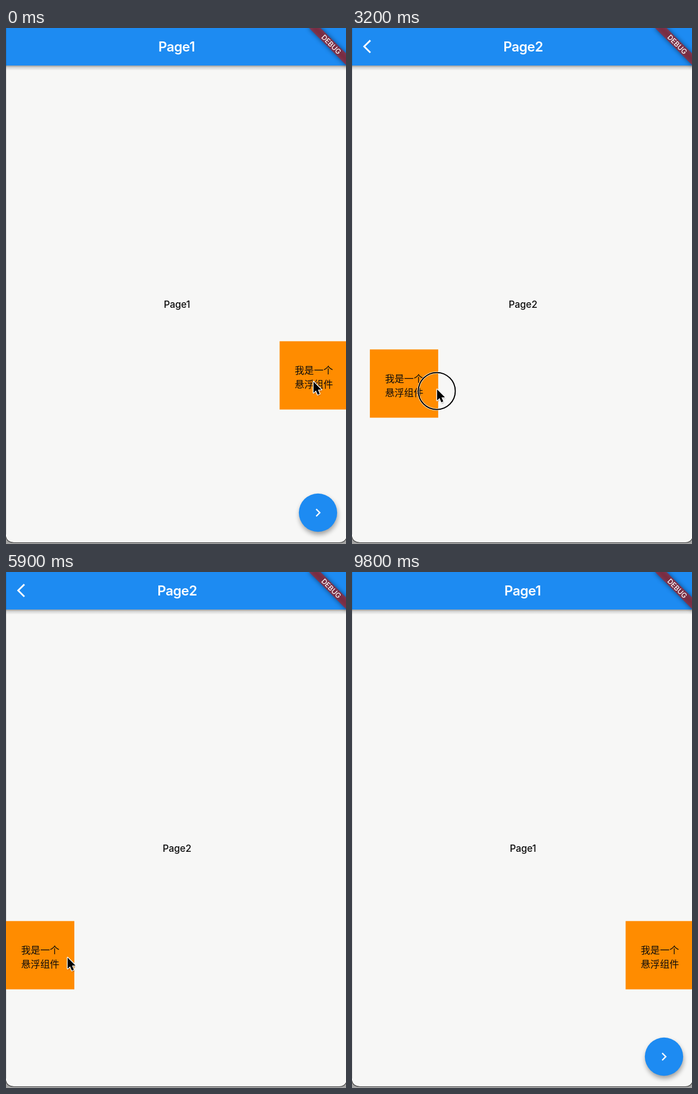
Recreate the animation shown at these times as an HTML page. Size 607 by 922 pixels, loop 9900 ms.

```html
<!DOCTYPE html>
<html lang="zh">
<head>
<meta charset="utf-8">
<title>Floating widget</title>
<style>
  html, body { margin: 0; width: 100%; height: 100%; overflow: hidden; background: #f7f7f6; }
  svg { display: block; width: 607px; height: 922px; }
  text { font: 500 17px Inter, sans-serif; letter-spacing: -.1px; fill: #0c0c0c; }
  .title { font-size: 24px; font-weight: 600; letter-spacing: -.5px; fill: #fff; }
  .mid { text-anchor: middle; }
  .float { font: 17.1px "Noto Sans CJK SC", "Noto Sans CJK", sans-serif; letter-spacing: 0; }
  .debug { font-size: 12.5px; letter-spacing: 0; fill: #fff; }
  .tip { font-size: 14.8px; font-weight: 400; fill: #fff; }
</style>
</head>
<body>
<svg viewBox="0 0 607 922">
  <defs>
    <linearGradient id="drop" x2="0" y2="1">
      <stop stop-color="#000" stop-opacity=".36"/>
      <stop offset=".4" stop-color="#000" stop-opacity=".13"/>
      <stop offset="1" stop-color="#000" stop-opacity="0"/>
    </linearGradient>
    <linearGradient id="edge">
      <stop stop-color="#000" stop-opacity="0"/>
      <stop offset=".6" stop-color="#000" stop-opacity=".05"/>
      <stop offset="1" stop-color="#000" stop-opacity=".2"/>
    </linearGradient>
    <filter id="soft" x="-50%" y="-150%" width="200%" height="400%">
      <feGaussianBlur stdDeviation="4"/>
    </filter>
    <filter id="blur" x="-50%" y="-50%" width="200%" height="200%">
      <feGaussianBlur stdDeviation="1.5"/>
    </filter>
    <g id="sheet">
      <rect width="610" height="922" fill="#f7f7f6"/>
      <rect y="67" width="610" height="9" fill="url(#drop)"/>
      <rect width="610" height="67" fill="#1d8bf2"/>
    </g>
    <path id="pointer" d="M0 0V22.5L5 17.8 8.6 26.3 12.6 24.6 9 16.2H16Z"/>
  </defs>

  <g id="page1">
    <use href="#sheet"/>
    <text class="title mid" x="304.5" y="42">Page1</text>
    <text class="mid" x="305.3" y="500">Page1</text>
    <circle cx="558" cy="871" r="34" opacity=".36" filter="url(#soft)"/>
    <circle cx="557" cy="866" r="34.2" fill="#1d8bf2"/>
    <path transform="translate(542.4 851.4) scale(1.22)" fill="#fff"
      d="M10 6 8.6 7.4 13.2 12 8.6 16.6 10 18 16 12Z"/>
  </g>

  <g id="page2">
    <rect x="-26" width="26" height="922" fill="url(#edge)"/>
    <use href="#sheet"/>
    <path transform="translate(19.6 18.4) scale(1.22)" fill="#fff"
      d="M11.7 3.9 9.9 2.1 0 12 9.9 21.9 11.7 20.1 3.5 12Z"/>
    <text class="title mid" x="305.5" y="42">Page2</text>
    <text class="mid" x="305.3" y="500">Page2</text>
  </g>

  <path d="M.5 0V905" stroke="#000" stroke-opacity=".12"/>

  <g id="box">
    <rect width="122" height="122" fill="#ff8c00"/>
    <text class="float" x="27" y="58.8">我是一个</text>
    <text class="float" x="27" y="83.2">悬浮组件</text>
  </g>

  <g id="tip">
    <rect x="12" y="62.5" width="49" height="29" rx="5" fill="#585858" opacity=".92"/>
    <text class="tip" x="21.5" y="82.5">Back</text>
  </g>

  <g transform="translate(610 0) rotate(45)">
    <rect x="-48.8" y="34.2" width="97.6" height="14.6" opacity=".5" filter="url(#soft)"/>
    <rect x="-48.8" y="34.2" width="97.6" height="14.6" fill="#b71c1c" fill-opacity=".627"/>
    <text class="debug mid" y="46">DEBUG</text>
  </g>

  <path d="M-1 905Q0 919.5 14 919.5H595Q606 919.5 609 908V925H-1Z"
    fill="#a4a4a4" stroke="#484848" stroke-width="1.2"/>

  <g id="ring" fill="none">
    <circle stroke="#fff" stroke-width="4" stroke-opacity=".75"/>
    <circle stroke="#000" stroke-width="2"/>
  </g>

  <g id="cursor">
    <g id="arrow" transform="scale(.88)">
      <use href="#pointer" x="1" y="2.5" opacity=".4" filter="url(#blur)"/>
      <use href="#pointer" stroke="#fff" stroke-width="3" stroke-linejoin="round"/>
      <use href="#pointer"/>
    </g>
    <g id="hand" stroke="#000" stroke-width="1.4" stroke-linejoin="round">
      <path fill="#fff" d="M-3 3C-4 0 0-1 1 2L4 10C6 8 8 9 8.5 11 10 9.5 12 10 12.5 12
        14 11 15 12 15 14 16 18 15 20 13 24H4C2 21-3 18-5 14-6 11-3 11 0 14Z"/>
      <path fill="none" d="M5 16V20M8.5 15.5V20M12 15V19.5"/>
    </g>
  </g>
</svg>

<script>
const LOOP = 9900, STEP = 100, WIDTH = 610, RIGHT = 488.5;
const el = id => document.getElementById(id);
const [page1, page2, box, tip, ring, cursor, arrow, hand] =
  ['page1', 'page2', 'box', 'tip', 'ring', 'cursor', 'arrow', 'hand'].map(el);
const circles = ring.querySelectorAll('circle');

// The pointer's script: each call appends one stretch of time.
const acts = [];
let clock = 0, spot = [549, 632];
function act(kind, ms, to = spot) {
  acts.push({ kind, start: clock, end: clock += ms, from: spot, to });
  spot = to;
}
const go = (x, y, ms) => act('go', ms, [x, y]);
const drag = (x, y, ms) => act('drag', ms, [x, y]);
const rest = ms => act('rest', ms);
const tap = () => act('tap', 90);

go(549, 625, 300);
drag(550, 638, 600);
drag(120, 636, 500);
rest(100);
go(548, 871, 500);
rest(200);
tap();
rest(210);
go(120, 642, 580);
drag(524, 688, 1520);
go(527, 682, 300);
rest(300);
drag(110, 689, 500);
rest(400);
drag(530, 689, 400);
go(34, 53, 400);
rest(110);
tap();
rest(1900);
go(603, 930, 700);

const drags = acts.filter(a => a.kind === 'drag');
const [push, pop] = acts.filter(a => a.kind === 'tap').map(a => a.end);

const clamp = (v, lo = 0, hi = 1) => Math.min(hi, Math.max(lo, v));
const smooth = k => k * k * (3 - 2 * k);
const mix = (a, b, k) => a + (b - a) * k;
const near = (x, y, cx, cy) => Math.hypot(x - cx, y - cy) < 34;
const show = (node, on) => node.style.display = on ? '' : 'none';
const move = (node, x, y) => node.setAttribute('transform', `translate(${x} ${y})`);

function pointAt(a, t) {
  const k = clamp((t - a.start) / (a.end - a.start));
  return a.from.map((v, i) => mix(v, a.to[i], a.kind === 'go' ? smooth(k) : k));
}

// The box follows each drag, then settles on the nearer side.
function boxAt(t) {
  let x = RIGHT, y = 559.7;
  for (const d of drags.filter(d => t >= d.start)) {
    const [px, py] = pointAt(d, t);
    x = clamp(x + px - d.from[0], 0, RIGHT);
    y += py - d.from[1];
    x = mix(x, x < RIGHT / 2 ? 0 : RIGHT, clamp((t - d.end) / 200));
  }
  return [x, y];
}

const bezier = (a, b, s) => 3 * (1 - s) * s * ((1 - s) * a + s * b) + s ** 3;

function slide(t, start) {
  const x = clamp((t - start) / 400);
  let lo = 0, hi = 1;
  for (let i = 0; i < 24; i++) {
    const s = (lo + hi) / 2;
    if (bezier(.35, .33, s) < x) lo = s; else hi = s;
  }
  return x === 1 ? 1 : bezier(.91, .97, lo);
}

function render(t) {
  const p = slide(t, push) - slide(t, pop);
  move(page1, -p * WIDTH / 3, 0);
  move(page2, (1 - p) * WIDTH, 0);
  show(page2, p > .001);
  move(box, ...boxAt(t));

  const now = acts.find(a => t < a.end);
  show(cursor, now);
  const [x, y] = now ? pointAt(now, t) : spot;
  const onBack = p > .5 && near(x, y, 27, 33);
  const onNext = p < .001 && near(x, y, 557, 866);
  move(cursor, x, y);
  show(hand, onBack || onNext);
  show(arrow, !onBack && !onNext);
  show(tip, onBack);

  // The ring widens for one step when the button is let go.
  const presses = a => a.kind === 'drag' || a.kind === 'tap';
  const held = now && presses(now);
  const freed = acts.some(a => presses(a) && t >= a.end && t < a.end + STEP);
  show(ring, held || freed);
  move(ring, x - (onBack ? 4 : .5), y + (onBack ? -3 : 3));
  circles.forEach(c => c.setAttribute('r', held ? 33 : 46.5));
}

const origin = performance.now();
function tick() {
  const t = Math.max(0, performance.now() - origin) % LOOP;
  render(Math.floor(t / STEP) * STEP);
  requestAnimationFrame(tick);
}
tick();
</script>
</body>
</html>
```
